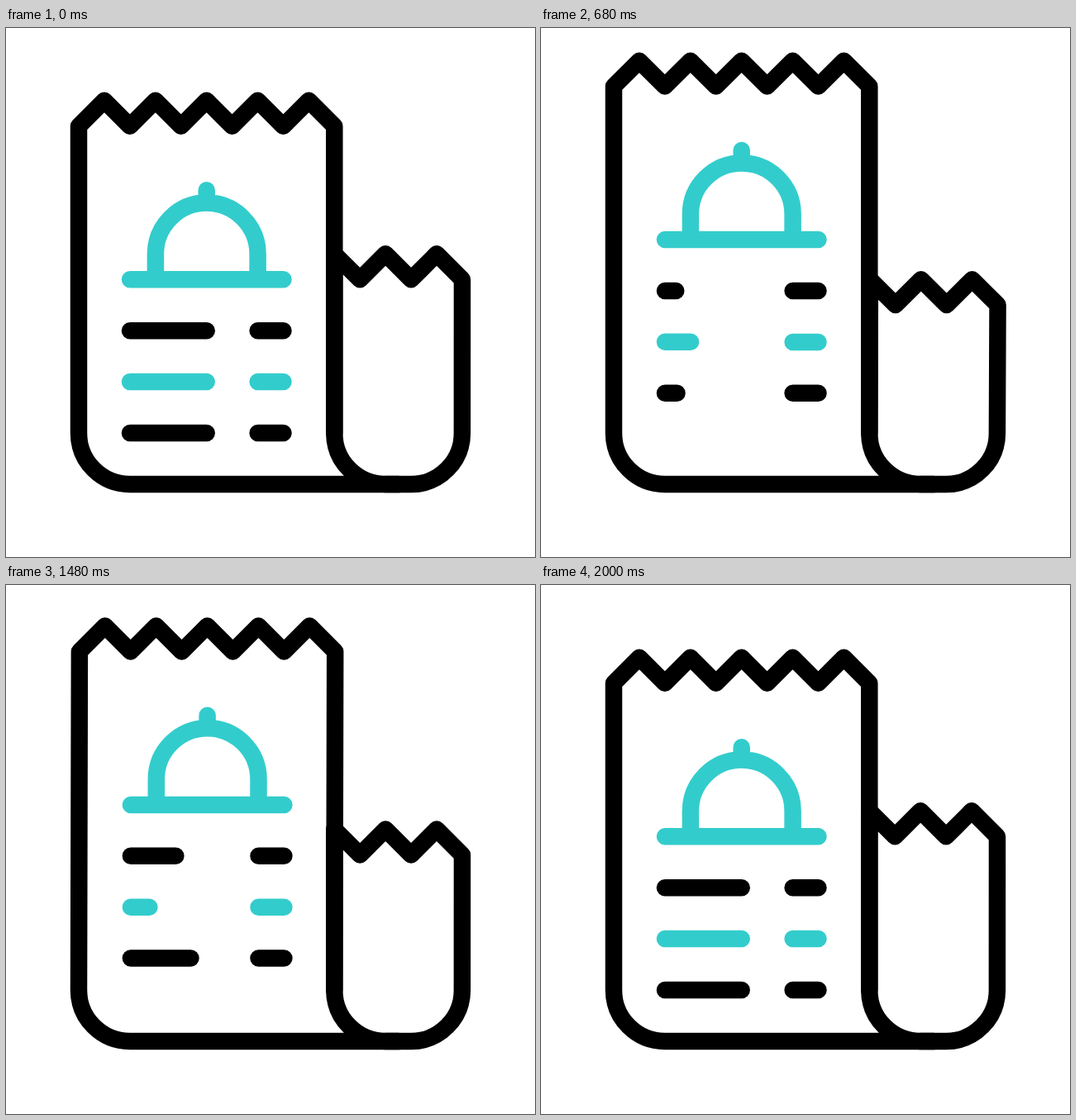
Write an HTML page that moves like this. It is 640 by 640 pixels and loops after 2.16 s.

```html
<!DOCTYPE html>
<html lang="en">
<head>
<meta charset="utf-8">
<title>Receipt</title>
<style>
html, body { margin: 0; width: 100%; height: 100%; overflow: hidden; background: #fff; }
svg { display: block; width: 100vw; height: 100vh; }
path { fill: none; stroke: #000; stroke-width: 20.5; stroke-linecap: round; stroke-linejoin: round; }
.teal { stroke: #3cc; }
</style>
</head>
<body>
<svg viewBox="0 0 640 640">
  <path id="tail"/>
  <path id="sheet"/>
  <g id="print">
    <path class="teal" d="M150 304.3H335.5M180.9 304.3V273.4A61.8 61.8 0 0 1 304.6 273.4V304.3ZM242.7 196.2V211.6"/>
    <path d="M304.6 366.2H335.5M304.6 490H335.5"/>
    <path class="teal" d="M304.6 428.1H335.5"/>
    <path id="bar0"/>
    <path id="bar1" class="teal"/>
    <path id="bar2"/>
  </g>
</svg>
<script>
const LOOP = 2160, FRAME = 40, STEP = 30.93;
const LEFT = 88, FOLD = 397.3, RIGHT = 551.9, BEND = 490.1, FLOOR = 552, RADIUS = 61.8;
const BAR_STARTS = [476, 504, 341], BAR_REPEAT = 645;

const el = id => document.getElementById(id);
const ease = x => (x = Math.min(1, Math.max(0, x)), x * x * (3 - 2 * x));
const ramp = (t, from, to) => ease((t - from) / (to - from));

// Torn edge running right, starting at the low point (x, y)
function zigzag(x, y, count) {
  let d = "";
  for (let i = 0; i <= count; i++) d += `L${x + i * STEP} ${y - (i % 2) * STEP} `;
  return d;
}

const corner = (x, y, sweep) => `A${RADIUS} ${RADIUS} 0 0 ${sweep} ${x} ${y}`;

function drawPaper(t) {
  // Weights of the high pull, the dip after it and the lower pull
  const fall = ramp(t, 712, 1010), rise = ramp(t, 1010, 1212);
  const high = ramp(t, 200, 450) - fall;
  const dip = fall - rise;
  const low = rise - ramp(t, 1578, 1955);

  const sx = .7 * dip + .9 * low, sy = -48.2 * high - 4 * dip - 38.4 * low;
  const tx = .6 * high + .4 * dip, ty = 30.8 * high - 2.3 * dip + 22.2 * low;

  el("sheet").setAttribute("d",
    `M475 ${FLOOR}H${LEFT + RADIUS}${corner(LEFT, BEND, 1)}` +
    zigzag(LEFT + sx, 118.8 + sy, 10) +
    `L${FOLD} ${BEND}${corner(FOLD + RADIUS, FLOOR, 0)}H475`);
  el("tail").setAttribute("d",
    `M${FOLD} ${BEND}L${FOLD + tx} ${273.4 + ty}` +
    zigzag(FOLD + STEP + tx, 304.3 + ty, 4) +
    `L${RIGHT} ${BEND}${corner(RIGHT - RADIUS, FLOOR, 1)}H${FOLD + RADIUS}`);
  el("print").setAttribute("transform", `translate(${sx} ${sy})`);
}

// Each bar shrinks and grows back twice, lower bars more slowly
function drawBar(i, t) {
  const half = 235 + 29.5 * i, y = 366.2 + 2 * STEP * i;
  let age = t - BAR_STARTS[i];
  if (age >= BAR_REPEAT) age -= BAR_REPEAT;
  const cut = .9 * ease(1 - Math.abs(age / half - 1));
  el("bar" + i).setAttribute("d", `M150 ${y}H${150 + 92.7 * (1 - cut)}`);
}

function tick() {
  const t = Math.floor(performance.now() % LOOP / FRAME) * FRAME;
  drawPaper(t);
  BAR_STARTS.forEach((_, i) => drawBar(i, t));
  requestAnimationFrame(tick);
}
tick();
</script>
</body>
</html>
```
